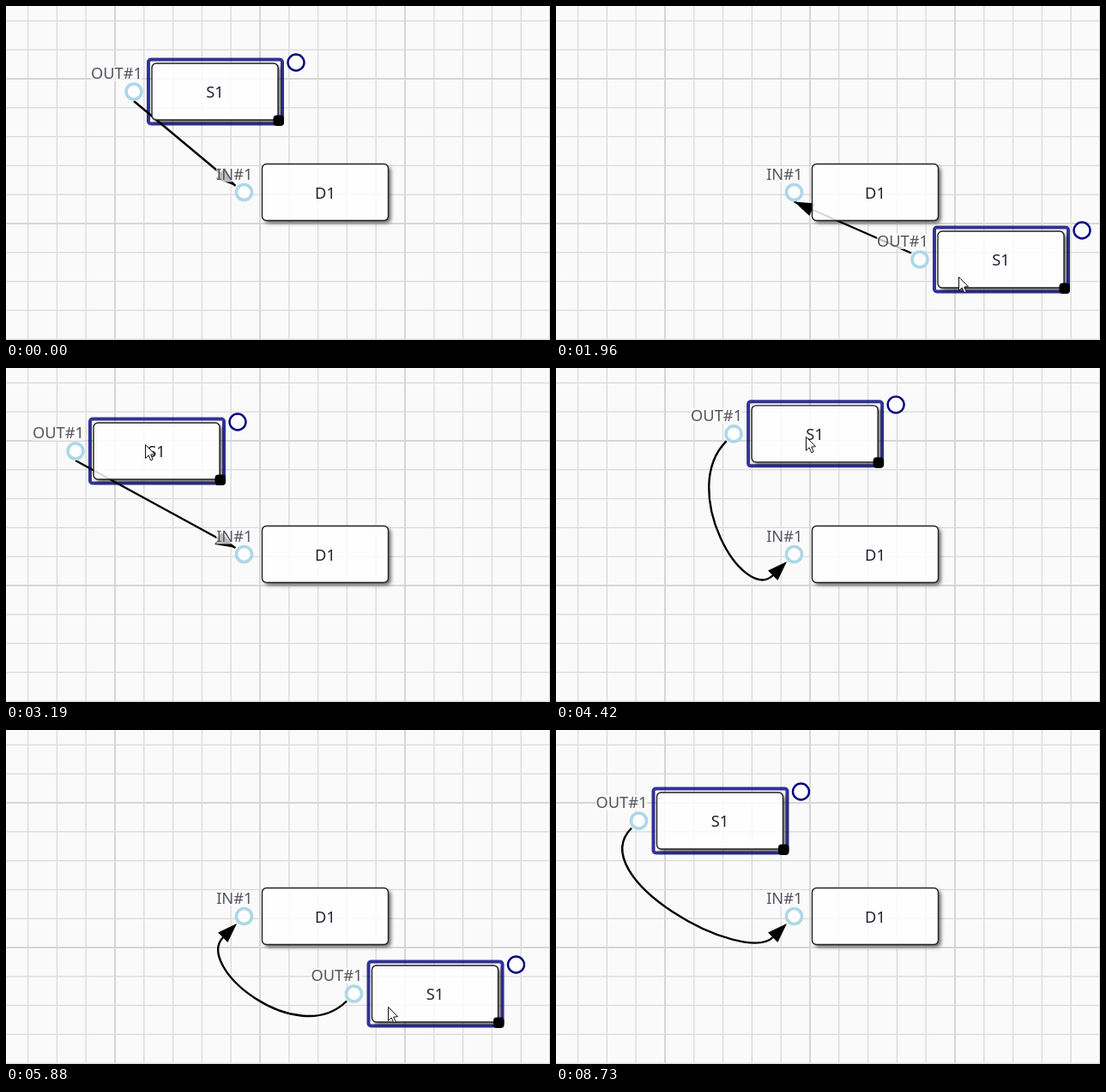
Recreate the animation shown at these times as an HTML page with a canvas. Size 634 by 390 pixels, loop 9490 ms.

```html
<!DOCTYPE html>
<html>
<head>
<meta charset="utf-8">
<style>
html, body { margin: 0; width: 100%; height: 100%; overflow: hidden; background: #fafafa; }
canvas { display: block; }
</style>
</head>
<body>
<canvas id="stage" width="634" height="390"></canvas>
<script>
const ctx = document.getElementById('stage').getContext('2d');
const LOOP = 9490;
const TICK = 1000 / 13;
const FIRST_TICK = 31;
const CURVED_FROM = 49;
const IN = { x: 277.5, y: 217.5 };
const GRIP = { x: 70, y: 4 };

// Key points of the two clockwise drags: tick, x, y
const drag = [
  [7, 149, 100], [14, 260, 110], [20, 450, 179], [25, 424, 296], [29, 240, 333],
  [33, 48, 290], [37, 22, 180], [41, 81, 97], [46, 128, 84],
  [48, 128, 84], [61, 270, 83], [67, 433.5, 147], [71, 488, 225], [76, 405.5, 308],
  [81, 190, 339], [86, 42, 240], [90, 89, 146], [93, 150, 98], [99, 96.5, 106]
];

const add = (p, q, k = 1) => ({ x: p.x + q.x * k, y: p.y + q.y * k });

function slope(track, i, axis) {
  const a = track[i - 1], b = track[i], c = track[i + 1];
  if (!a || !c) return 0;
  const still = (p, q) => p[1] === q[1] && p[2] === q[2];
  if (still(a, b) || still(b, c)) return 0;
  return (c[axis] - a[axis]) / (c[0] - a[0]);
}

// Smooth curve through the key points
function follow(track, n) {
  const first = track[0], last = track[track.length - 1];
  n = Math.min(Math.max(n, first[0]), last[0] - 1e-6);
  const i = track.findIndex(key => key[0] > n) - 1;
  const a = track[i], b = track[i + 1], span = b[0] - a[0];
  const u = (n - a[0]) / span, v = 1 - u;
  const mix = axis =>
    v * v * (1 + 2 * u) * a[axis] + u * u * (3 - 2 * u) * b[axis] +
    span * u * v * (v * slope(track, i, axis) - u * slope(track, i + 1, axis));
  return { x: mix(1), y: mix(2) };
}

function glide(from, to, u) {
  const e = u * u * (3 - 2 * u);
  return add(add(from, from, -e), to, e);
}

// The pointer runs one tick ahead of the box it drags
function pointerAt(n, out) {
  const held = add(out, GRIP);
  if (n < 0 || n >= 113) return null;
  if (n < 6) return glide({ x: 274, y: 305 }, held, n / 6);
  if (n > 103) return glide(held, { x: 482, y: 384 }, (n - 103) / 9);
  const h = 0.1;
  const step = add(follow(drag, n + h), follow(drag, n - h), -1);
  return add(held, step, 1 / (2 * h));
}

function ring(x, y, r, color, width) {
  ctx.beginPath();
  ctx.arc(x, y, r, 0, 2 * Math.PI);
  ctx.fillStyle = 'rgba(255,255,255,0.75)';
  ctx.fill();
  ctx.strokeStyle = color;
  ctx.lineWidth = width;
  ctx.stroke();
}

function rounded(x, y, w, h, r) {
  ctx.beginPath();
  ctx.roundRect(x, y, w, h, r);
}

function drawGrid() {
  ctx.fillStyle = '#fafafa';
  ctx.fillRect(0, 0, 634, 390);
  for (let k = -3; k < 16; k++) {
    const major = k % 5 === 0;
    const size = major ? 2 : 1.3;
    ctx.fillStyle = major ? '#d6d6d6' : '#dadada';
    ctx.fillRect(127 + k * 33.8 - size / 2, 0, size, 390);
    ctx.fillRect(0, 85 + k * 33.8 - size / 2, 634, size);
  }
}

function drawHead(tip, angle) {
  ctx.save();
  ctx.translate(tip.x, tip.y);
  ctx.rotate(angle);
  ctx.beginPath();
  ctx.moveTo(0, 0);
  ctx.lineTo(-23, -8);
  ctx.lineTo(-23, 8);
  ctx.closePath();
  ctx.fillStyle = '#000';
  ctx.fill();
  ctx.restore();
}

function drawLink(out, curved) {
  ctx.strokeStyle = '#000';
  ctx.lineWidth = 2.4;
  ctx.beginPath();
  if (curved) {
    const [left, right] = out.x < IN.x ? [out, IN] : [IN, out];
    const side = right.y >= left.y ? 1 : -1;
    const shift = (p, d) => add(p, { x: -d, y: side * d });
    const start = shift(out, 8.5), tip = shift(IN, 8.5);
    const base = shift(tip, 15.5);
    const c = shift(start, 57), d = shift(base, 35);
    ctx.moveTo(start.x, start.y);
    ctx.bezierCurveTo(c.x, c.y, d.x, d.y, base.x, base.y);
    ctx.stroke();
    drawHead(tip, -side * Math.PI / 4);
  } else {
    const anchor = (p, q) => {
      const side = q.y >= p.y ? 1 : -1;
      return add(p, q.x < p.x ? { x: -10, y: side * 7.5 } : { x: 0, y: side * 11 });
    };
    const start = anchor(out, IN), tip = anchor(IN, out);
    ctx.moveTo(start.x, start.y);
    ctx.lineTo(tip.x, tip.y);
    ctx.stroke();
    drawHead(tip, Math.atan2(tip.y - start.y, tip.x - start.x));
  }
}

function drawHalo(p) {
  rounded(p.x + 17, p.y - 37.5, 156, 75, 3);
  ctx.strokeStyle = 'rgba(0,0,127,0.8)';
  ctx.lineWidth = 4;
  ctx.stroke();
}

function drawNode(p, name, label) {
  const box = [p.x + 21, p.y - 33, 147, 66, 5];
  // Shadow only outside the translucent box
  ctx.save();
  ctx.beginPath();
  ctx.rect(0, 0, 634, 390);
  ctx.roundRect(...box);
  ctx.clip('evenodd');
  ctx.shadowColor = 'rgba(0,0,0,0.6)';
  ctx.shadowBlur = 4;
  ctx.shadowOffsetX = ctx.shadowOffsetY = 3;
  ctx.fillStyle = '#000';
  rounded(...box);
  ctx.fill();
  ctx.restore();

  rounded(...box);
  ctx.fillStyle = 'rgba(255,255,255,0.85)';
  ctx.fill();
  ctx.strokeStyle = '#222';
  ctx.lineWidth = 1.4;
  ctx.stroke();

  ctx.font = '18.3px "Noto Sans", sans-serif';
  ctx.textAlign = 'center';
  ctx.fillStyle = '#222230';
  ctx.fillText(name, p.x + 94.5, p.y + 7);

  ring(p.x, p.y, 9, '#add8e6', 3.6);
  ctx.textAlign = 'right';
  const width = ctx.measureText(label).width;
  ctx.fillStyle = 'rgba(250,250,250,0.75)';
  ctx.fillRect(p.x + 10 - width, p.y - 30, width, 18);
  ctx.fillStyle = '#555560';
  ctx.fillText(label, p.x + 10, p.y - 15);
}

function drawHandles(p) {
  rounded(p.x + 162.5, p.y + 27.5, 12.5, 12.5, 4);
  ctx.fillStyle = '#000';
  ctx.fill();
  ring(p.x + 189, p.y - 34, 9.5, '#00007f', 2.4);
}

function drawPointer(p) {
  ctx.save();
  ctx.translate(Math.round(p.x) - 0.5, Math.round(p.y) - 0.5);
  ctx.beginPath();
  [[0, 0], [0, 16], [3.7, 12.5], [6.3, 18.3], [8.7, 17.2], [6.2, 11.6], [11, 11.2]]
    .forEach(([x, y]) => ctx.lineTo(x, y));
  ctx.closePath();
  ctx.fillStyle = '#fff';
  ctx.fill();
  ctx.strokeStyle = '#111';
  ctx.lineWidth = 1;
  ctx.stroke();
  ctx.restore();
}

function draw(t) {
  const n = Math.floor((t - FIRST_TICK) / TICK);
  const out = follow(drag, n);
  drawGrid();
  drawHalo(out);
  drawLink(out, n >= CURVED_FROM);
  drawNode(IN, 'D1', 'IN#1');
  drawNode(out, 'S1', 'OUT#1');
  drawHandles(out);
  const pointer = pointerAt(n, out);
  if (pointer) drawPointer(pointer);
}

const began = performance.now();
function animate() {
  draw((performance.now() - began) % LOOP);
  requestAnimationFrame(animate);
}
animate();
</script>
</body>
</html>
```
